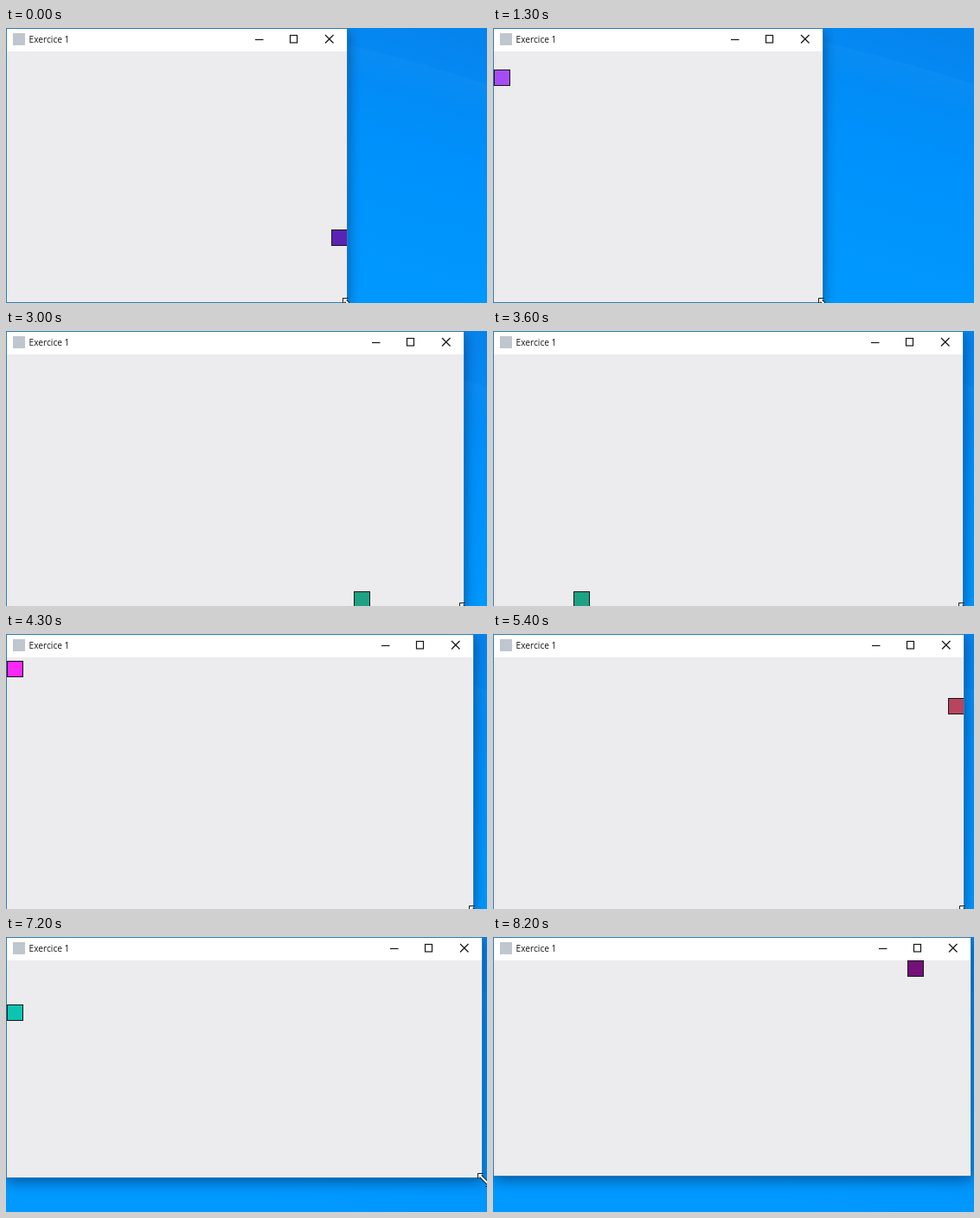
An HTML page with a canvas for the animation above (8300 ms loop, 556 by 318 pixels).

```html
<!DOCTYPE html>
<html lang="fr">
<head>
<meta charset="utf-8">
<title>Exercice 1</title>
<style>
  html, body { margin: 0; width: 100%; height: 100%; overflow: hidden; background: #0090f8; }
  canvas { display: block; }
</style>
</head>
<body>
<canvas id="stage" width="556" height="318"></canvas>
<script>
const ctx = document.getElementById('stage').getContext('2d');
const LOOP = 8300, STEP = 100, BAR = 27, BOX = 18, INK = '#161616';

// Window size while its corner is dragged: time, right edge, bottom edge
const sizes = [
  [0, 394, 317], [900, 389, 317], [1300, 381, 317], [1800, 388, 317],
  [2265, 510, 319], [2600, 529, 319], [3000, 529, 319], [3300, 547, 319],
  [3600, 543, 319], [4300, 540, 319], [5400, 544, 319], [5780, 553, 288],
  [6200, 554, 284], [6840, 552, 280], [7200, 550, 278], [7600, 552, 276],
  [LOOP, 552, 276]
];

// Clockwise walk along the edges: start time, side, from, to, colour
const legs = [
  [0, 'right', 233, 299, '#5a23b6'],
  [127, 'bottom', 375, 1, '#3f9ad0'],
  [835, 'left', 299, 27, '#a64cf6'],
  [1339, 'top', 1, 492, '#d0703a'],
  [2265, 'right', 27, 301, '#5cb83c'],
  [2789, 'bottom', 511, 1, '#1da283'],
  [3779, 'left', 301, 27, '#fa28fa'],
  [4308, 'top', 1, 526, '#4a62d8'],
  [5310, 'right', 27, 270, '#b8455e'],
  [5780, 'bottom', 535, 1, '#c8c52d'],
  [6840, 'left', 262, 27, '#0cc4b2'],
  [7300, 'top', 1, 532, '#74107a']
];

const lerp = (a, b, k) => a + (b - a) * k;

function windowSize(t) {
  const i = sizes.findIndex(s => s[0] > t);
  const a = sizes[i - 1], b = sizes[i], k = (t - a[0]) / (b[0] - a[0]);
  return [1, 2].map(n => Math.round(lerp(a[n], b[n], k)));
}

function boxAt(t, w, h) {
  let i = legs.length - 1;
  while (legs[i][0] > t) i--;
  const [start, side, from, to, color] = legs[i];
  const end = i + 1 < legs.length ? legs[i + 1][0] : LOOP;
  const p = Math.round(lerp(from, to, (t - start) / (end - start)));
  const spot = { top: [p, BAR], right: [w - BOX, p], bottom: [p, h - BOX], left: [1, p] };
  return [...spot[side], color];
}

function fill(color, x, y, w, h) {
  ctx.fillStyle = color;
  ctx.fillRect(x, y, w, h);
}

function stroke(color, points) {
  ctx.strokeStyle = color;
  ctx.beginPath();
  points.forEach(([x, y]) => ctx.lineTo(x, y));
  ctx.stroke();
}

function drawDesktop() {
  const sky = ctx.createLinearGradient(500, 0, 400, 318);
  sky.addColorStop(0, '#0684ee');
  sky.addColorStop(.4, '#0090fb');
  sky.addColorStop(1, '#0099ff');
  fill(sky, 0, 0, 556, 318);

  // Faint light ray
  const ray = ctx.createLinearGradient(470, 36, 458, 76);
  ray.addColorStop(0, 'rgba(50,170,255,.13)');
  ray.addColorStop(1, 'rgba(50,170,255,0)');
  ctx.fillStyle = ray;
  ctx.beginPath();
  ctx.moveTo(340, 6);
  ctx.quadraticCurveTo(460, 34, 556, 65);
  ctx.lineTo(556, 160);
  ctx.lineTo(340, 100);
  ctx.fill();
}

function drawWindow(w, h) {
  ctx.save();
  ctx.shadowColor = 'rgba(0,20,60,.5)';
  ctx.shadowBlur = 15;
  ctx.shadowOffsetY = 4;
  fill('#ecebed', 0, 0, w + 1, h + 1);
  ctx.restore();
  fill('#fff', 0, 0, w, BAR);

  fill('#bfc6ce', 8, 6, 14, 14);
  ctx.fillStyle = INK;
  ctx.font = '10.2px "Open Sans", "Noto Sans", sans-serif';
  ctx.fillText('Exercice 1', 26.5, 17);

  ctx.lineWidth = 1.2;
  stroke(INK, [[w - 106, 13.5], [w - 96.5, 13.5]]);
  ctx.strokeRect(w - 65.5, 8.5, 8, 8.5);
  stroke(INK, [[w - 25, 8], [w - 15.5, 17.5]]);
  stroke(INK, [[w - 15.5, 8], [w - 25, 17.5]]);
}

function drawBox(x, y, color, w, h) {
  ctx.save();
  ctx.beginPath();
  ctx.rect(1, BAR, w - 1, h - BAR);
  ctx.clip();
  fill(INK, x, y, 19, 19);
  fill(color, x + 1, y + 1, 17, 17);
  ctx.restore();
}

// Diagonal resize pointer on the dragged corner
function drawPointer(x, y) {
  ctx.save();
  ctx.translate(x + .5, y + .5);
  const heads = [[[0, 6], [0, 0], [6, 0]], [[15, 9], [15, 15], [9, 15]]];
  ctx.lineWidth = 4;
  stroke(INK, [[3, 3], [12, 12]]);
  ctx.lineWidth = 1;
  heads.forEach(p => {
    ctx.fillStyle = '#fff';
    stroke(INK, [...p, p[0]]);
    ctx.fill();
    stroke(INK, p);
  });
  ctx.lineWidth = 2;
  stroke('#fff', [[2, 2], [13, 13]]);
  ctx.restore();
}

function draw(t) {
  const [w, h] = windowSize(t);
  const [x, y, color] = boxAt(t, w, h);
  drawDesktop();
  drawWindow(w, h);
  drawBox(x, y, color, w, h);
  ctx.lineWidth = 1;
  ctx.strokeStyle = '#2f7cb3';
  ctx.strokeRect(.5, .5, w, h);
  if (t < 7700) drawPointer(w - 5, h - 5);
}

const began = performance.now();
function tick() {
  const t = (performance.now() - began) % LOOP;
  draw(Math.floor(t / STEP) * STEP);
  requestAnimationFrame(tick);
}
tick();
</script>
</body>
</html>
```
